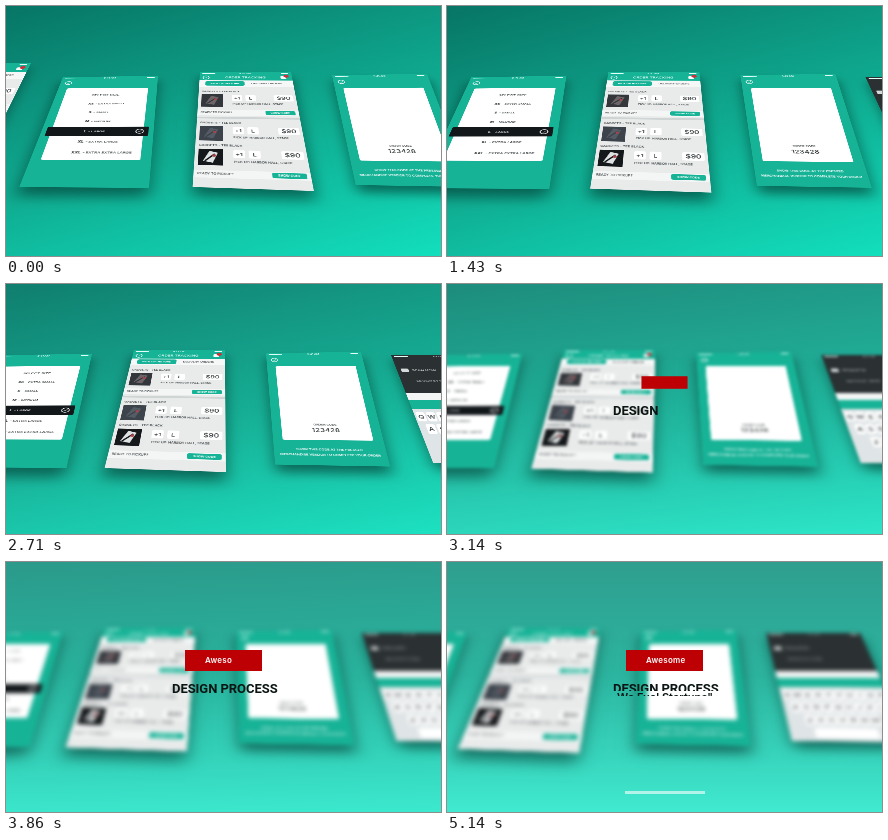
Recreate the animation shown at these times as an HTML page. Size 435 px wide and 250 px high, loop 5.28 s.

```html
<!DOCTYPE html>
<html lang="en">
<head>
<meta charset="utf-8">
<title>Design process</title>
<style>
html, body { margin: 0; width: 100%; height: 100%; overflow: hidden; background: #10aa91; }
#stage { position: relative; width: 435px; height: 250px; overflow: hidden;
  background: linear-gradient(165deg, #077565, #0c937e 28%, #0fae93 55%, #12dfbd); }
#stage > * { position: absolute; }
#glow, #cards { inset: 0; }
#glow { background: linear-gradient(#2f9e8f, #2cb5a0 45%, #40ead0); }
#cards svg { position: absolute; left: 0; top: 0; transform-origin: 0 0;
  box-shadow: 0 18px 24px rgba(0, 48, 40, .6); font-family: Inter, sans-serif; }
#tag { left: 179px; top: 88px; width: 77px; height: 21px; background: #bd0004; }
#word { left: 199px; top: 88px; color: #fff; white-space: pre;
  font: 600 8px/21px Inter, sans-serif; letter-spacing: .25px; }
.line { left: 166px; width: 120px; overflow: hidden; white-space: pre; color: #0b1513; }
#title { top: 119px; font: 700 13px/16px Roboto, sans-serif; letter-spacing: -.05px; }
#next { top: 129px; left: 170px; font: 600 11px/13px Inter, sans-serif; }
#bar { top: 229px; height: 3px; background: rgba(255, 255, 255, .6); filter: blur(.6px); }
</style>
</head>
<body>
<div id="stage">
  <div id="glow"></div>
  <div id="cards"></div>
  <div id="tag"></div>
  <div id="word"></div>
  <div id="title" class="line"></div>
  <div id="next" class="line">We Fuel Startups"</div>
  <div id="bar"></div>
</div>
<script>
const W = 180, H = 320, LOOP = 5280, STEP = LOOP / 37;
const TEAL = '#17b397', INK = '#33393b';
const $ = id => document.getElementById(id);

const rect = (x, y, w, h, fill, r = 0, extra = '') =>
  `<rect x="${x}" y="${y}" width="${w}" height="${h}" rx="${r}" fill="${fill}" ${extra}/>`;
const text = (x, y, s, size = 6, fill = INK, anchor = 'start', weight = 500) =>
  `<text x="${x}" y="${y}" font-size="${size}" fill="${fill}" text-anchor="${anchor}" font-weight="${weight}">${s}</text>`;
const dot = (x, y, r, fill, extra = '') => `<circle cx="${x}" cy="${y}" r="${r}" fill="${fill}" ${extra}/>`;
const ring = (x, y) => dot(x, y, 6, 'none', 'stroke="#fff" stroke-width="1.4"') +
  `<path d="M${x - 2.5} ${y}l2 2 3-4" fill="none" stroke="#fff"/>`;
const status = () => rect(5, 4, 26, 2, '#e4fff9') + text(90, 8, '9:41 AM', 6, '#fff', 'middle') +
  rect(160, 3, 14, 4, '#e4fff9');

function ordersCard() {
  const item = (y, photo, shirt, ready) =>
    rect(0, y, W, 60, '#e9ebeb') + text(6, y + 8, 'GADGETS - TEE BLACK', 6.5) +
    rect(6, y + 15, 40, 39, photo) +
    `<path d="M14 ${y + 44}l10-24 14 4-8 24z" fill="${shirt}"/>` +
    `<path d="M17 ${y + 44}l16-17" stroke="${photo}" stroke-width="3"/>` +
    dot(32, y + 31, 3, '#a8434a') +
    [[63, 19, '+1'], [88, 19, 'L'], [140, 35, '$90']].map(([x, w, s]) =>
      rect(x, y + 17, w, 19, '#fff', 3) + text(x + w / 2, y + 31, s, s[0] == '$' ? 13 : 11, INK, 'middle')).join('') +
    text(64, y + 47, 'PICK UP: HARBOR HALL, STAGE', 6) +
    (ready ? rect(0, ready - 10, W, 17, '#f4f5f5') + text(6, ready, 'READY TO PICKUP?', 6) +
      rect(122, ready - 8, 52, 12, TEAL, 3) + text(148, ready, 'SHOW CODE', 5.5, '#fff', 'middle', 700) : '');
  return rect(0, 0, W, H, '#e9ebeb') + rect(0, 0, W, 30, TEAL) + status() + ring(13, 20) +
    text(90, 23, 'ORDER TRACKING', 9, '#c9f3ea', 'middle') +
    rect(158, 15, 11, 9, '#fff', 2) + dot(169, 15, 5, '#c8323c') +
    rect(0, 30, W, 22, '#f6f7f7') + rect(12, 33, 76, 15, TEAL, 4) +
    text(50, 43, 'PICK UP INSTORE', 6.5, '#fff', 'middle', 700) +
    text(130, 43, 'DELIVERY ORDERS', 6.5, INK, 'middle') +
    item(62, '#33373b', '#6d6468', 135) + rect(0, 146, W, 5, '#cfd4d4') +
    item(157, '#3c434b', '#545c66') + item(217, '#15181a', '#dfe2e3', 292);
}

function sizeCard() {
  const sizes = ['XS - EXTRA SMALL', 'S - SMALL', 'M - MEDIUM', 'L - LARGE', 'XL - EXTRA LARGE', 'XXL - EXTRA EXTRA LARGE'];
  return rect(0, 0, W, H, TEAL) + status() + ring(15, 24) +
    rect(16, 44, 148, 214, '#fff', 3) + text(90, 72, 'SELECT SIZE', 8, INK, 'middle') +
    rect(8, 170, 164, 26, '#12171a', 2) + ring(158, 183) +
    sizes.map((s, i) => {
      const [name, label] = s.split(' - '), y = 101 + i * 28.2, fill = i == 3 ? '#fff' : INK;
      return text(73, y, name, 7, fill, 'end', 800) + text(76, y, '- ' + label, 6.7, fill);
    }).join('');
}

const codeCard = () => rect(0, 0, W, H, TEAL) + status() + ring(15, 24) +
  rect(16, 45, 148, 213, '#fff', 3) +
  text(90, 220, 'ORDER CODE', 6, INK, 'middle') + text(90, 237, '123428', 13, INK, 'middle') +
  text(90, 284, 'SHOW THIS CODE AT THE PRESSED', 6.2, '#fff', 'middle', 600) +
  text(90, 297, 'MERCHANDISE VENDOR TO COMPLETE YOUR ORDER', 6.2, '#fff', 'middle', 600);

function searchCard() {
  const keys = ['QWERTYUIOP', 'ASDFGHJKL', 'ZXCVBNM'].map((row, r) =>
    [...row].map((c, i) => {
      const x = 3 + i * 17.6 + [0, 9, 27][r], y = 186 + r * 34;
      return rect(x, y, 15, 26, '#fff', 3) + text(x + 7.5, y + 18, c, 13, INK, 'middle');
    }).join('')).join('');
  return rect(0, 0, W, H, '#dfe4e6') + rect(0, 0, W, 128, '#2b3032') + status() +
    rect(8, 48, 14, 12, '#d5dadb', 2) +
    text(28, 57, 'SCAN NOW', 8, '#d5dadb') + rect(8, 76, 150, 1, '#8b9294') +
    text(28, 92, 'SEARCH BY NAME', 7, '#a9b1b2') +
    rect(0, 128, W, 22, '#f4f6f6') + rect(0, 150, W, 27, TEAL) +
    keys + rect(40, 288, 100, 25, '#fff', 3);
}

// Bottom corners follow the top ones: x' = slope * x + shift.
const cards = [
  { dx: -262, w: 93, draw: ordersCard, y: [57, 57, 185, 181], slope: 1.333, left: -72, right: -72, drop: 6 },
  { dx: -137, w: 95, draw: sizeCard, y: [71, 70, 182, 181], slope: 1.25, left: -58, right: -47, drop: 4 },
  { dx: 0, w: 91, draw: ordersCard, y: [66, 66, 185, 181], slope: 1.333, left: -72, right: -72, drop: 6 },
  { dx: 132, w: 95, draw: codeCard, y: [69, 68, 181, 179], slope: 1.22, left: -48, right: -49, drop: 3 },
  { dx: 257, w: 94, draw: searchCard, y: [71, 71, 180, 179], slope: 1.25, left: -54, right: -55, drop: 0 }
];
for (const c of cards) {
  $('cards').insertAdjacentHTML('beforeend', `<svg width="${W}" height="${H}" viewBox="0 0 ${W} ${H}">${c.draw()}</svg>`);
  c.el = $('cards').lastElementChild;
}

// Piecewise linear value through [time, value] points.
function track(t, points) {
  const i = points.findIndex(p => p[0] > t);
  if (i < 0) return points[points.length - 1][1];
  if (!i) return points[0][1];
  const [a, b] = [points[i - 1], points[i]];
  return a[1] + (b[1] - a[1]) * (t - a[0]) / (b[0] - a[0]);
}

// Projective transform from the card rectangle to a quad, clockwise from top left.
function project([x0, y0], [x1, y1], [x2, y2], [x3, y3]) {
  const ax = x1 - x2, bx = x3 - x2, sx = x0 - x1 + x2 - x3;
  const ay = y1 - y2, by = y3 - y2, sy = y0 - y1 + y2 - y3;
  const den = ax * by - bx * ay, g = (sx * by - bx * sy) / den, h = (ax * sy - sx * ay) / den;
  const m = [(x1 - x0 + g * x1) / W, (y1 - y0 + g * y1) / W, 0, g / W,
    (x3 - x0 + h * x3) / H, (y3 - y0 + h * y3) / H, 0, h / H, 0, 0, 1, 0, x0, y0, 0, 1];
  return `matrix3d(${m.map(v => v.toFixed(9))})`;
}

function render(t) {
  const x = track(t, [[0, 194], [860, 176], [2140, 143], [2710, 128], [3430, 110], [4290, 87], [5280, 58]]);
  for (const { el, dx, w, y, slope, left, right, drop } of cards) {
    const l = x + dx, r = l + w, d = drop * t / LOOP;
    el.style.transform = project([l, y[0]], [r, y[1]],
      [slope * r + right, y[2] + d], [slope * l + left, y[3] + d]);
  }
  const blur = track(t, [[2760, 0], [3300, 2.2]]);
  $('cards').style.filter = blur ? `blur(${blur}px)` : 'none';
  $('glow').style.opacity = track(t, [[2430, 0], [3430, .8], [4290, 1]]);

  $('tag').style.transform = `scale(${track(t, [[2900, 0], [3140, .6], [3430, .9], [3570, 1]])})`;
  $('word').textContent = 'Awesome'.slice(0, Math.max(0, Math.floor((t - 3480) / 70)));
  $('title').textContent = 'DESIGN PROCESS'.slice(0, Math.max(0, Math.floor((t - 2740) / 52)));
  $('title').style.height = track(t, [[4850, 16], [5140, 9.5]]) + 'px';
  $('next').style.height = track(t, [[4850, 0], [5140, 5]]) + 'px';

  const half = track(t, [[4700, 0], [5140, 40]]);
  $('bar').style.left = 218 - half + 'px';
  $('bar').style.width = 2 * half + 'px';
}

function tick() {
  const t = performance.now() % LOOP;
  render(Math.floor((t + 8) / STEP) % 37 * STEP);
  requestAnimationFrame(tick);
}
tick();
</script>
</body>
</html>
```
